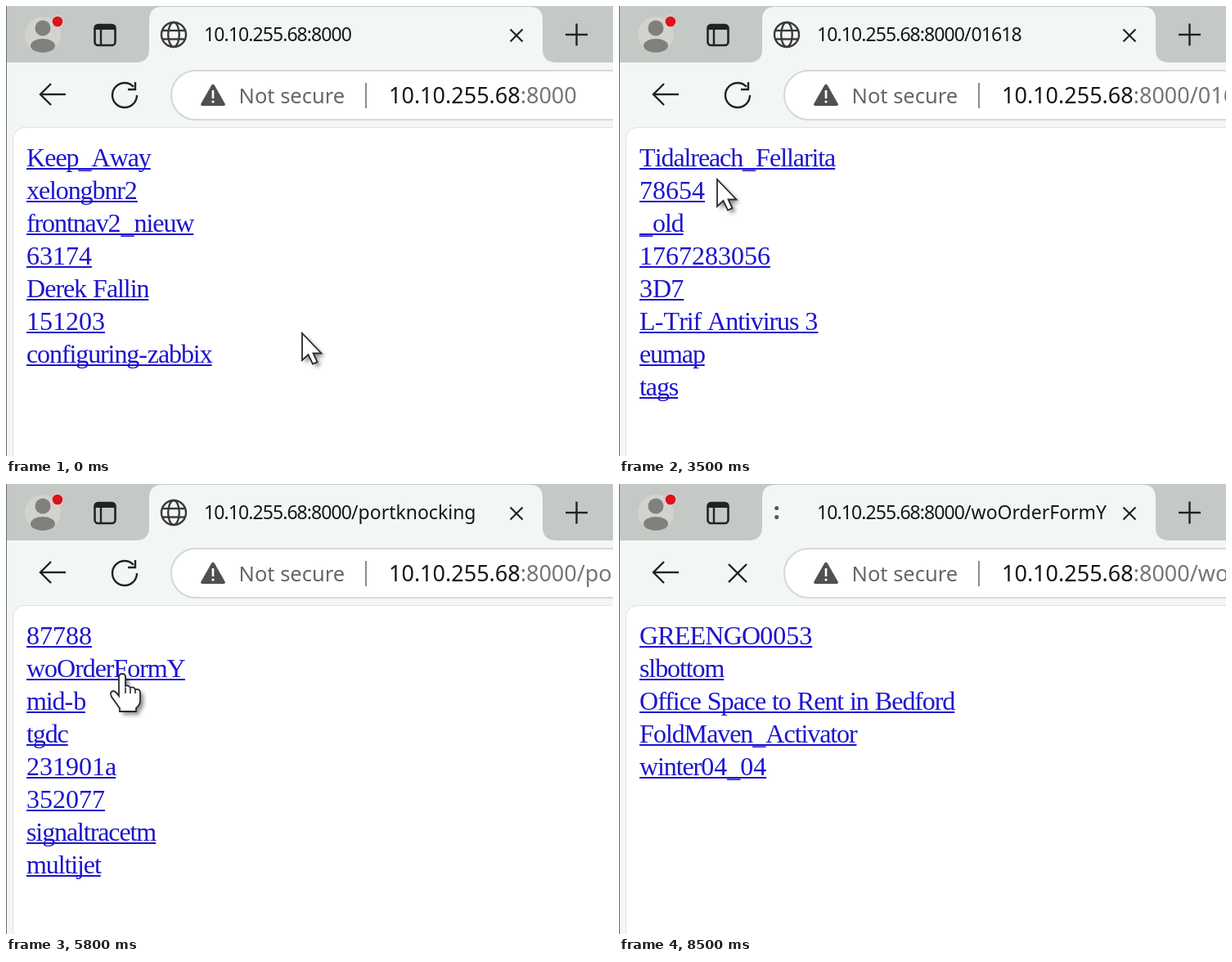
Animation of 742 by 550 pixels, one loop 8.6 s. Source, as an HTML page with a canvas:

```html
<!DOCTYPE html>
<html lang="en">
<head>
<meta charset="utf-8">
<title>Link maze</title>
<style>
  html, body { margin: 0; width: 100%; height: 100%; overflow: hidden; background: #fff; }
  canvas { display: block; width: 742px; height: 550px; }
</style>
</head>
<body>
<canvas id="stage" width="742" height="550"></canvas>
<script>
const ctx = document.getElementById('stage').getContext('2d');
const LOOP = 8600, STEP = 100;
const SANS = '"Noto Sans", "Open Sans", sans-serif';
const SERIF = '"Liberation Serif", "Times New Roman", serif';
const HOST = '10.10.255.68', PORT = ':8000';
const STRIP = '#c5c9c5', BAR = '#f3f7f4', INK = '#222', LINK = '#1d15cc';

const pages = [
  { at: 0, path: '', links: ['Keep_Away', 'xelongbnr2', 'frontnav2_nieuw', '63174', 'Derek Fallin', '151203', 'configuring-zabbix'] },
  { at: 1100, path: '/Keep_Away', links: ['2003022209_pthomenetworkside27', 'Elfen', '01618', '74397', 'hightech'] },
  { at: 2900, path: '/01618', links: ['Tidalreach_Fellarita', '78654', '_old', '1767283056', '3D7', 'L-Trif Antivirus 3', 'eumap', 'tags'] },
  { at: 4600, path: '/Tidalreach_Fellarita', links: ['20031104', 'portknocking', 'menu_top', '44718', 'archive2'] },
  { at: 5800, path: '/portknocking', links: ['87788', 'woOrderFormY', 'mid-b', 'tgdc', '231901a', '352077', 'signaltracetm', 'multijet'] },
  { at: 7300, path: '/woOrderFormY', links: ['GREENGO0053', 'slbottom', 'Office Space to Rent in Bedford', 'FoldMaven_Activator', 'winter04_04'] }
];

// Row pressed just before each load, then the span of its spinner
const loads = [
  { row: 0, from: 800, to: 1100 },
  { row: 2, from: 2500, to: 2900 },
  { row: 0, from: 4200, to: 4700 },
  { row: 1, from: 5400, to: 5800 },
  { row: 1, from: 6800, to: 7600 },
  { row: 2, from: 8500, to: 8600 }
];

// Pointer stops: time, x, y
const stops = [
  [0, 362, 400], [600, 110, 190], [1000, 112, 192], [1500, 330, 300], [1800, 349, 315],
  [2000, 115, 235], [2400, 85, 262], [2900, 88, 264], [3500, 120, 212], [4100, 130, 190],
  [4800, 130, 190], [5100, 306, 394], [5400, 142, 232], [5800, 142, 232], [6300, 300, 340],
  [6700, 84, 222], [7100, 84, 222], [7500, 59, 222], [7700, 363, 314], [7800, 355, 305],
  [7900, 355, 305], [8200, 200, 266], [8600, 200, 266]
];

const arrow = new Path2D('M0 0V33L7.5 26L13 37.5L18.5 35L13.5 24.5H23.5Z');
const hand = new Path2D('M-4 4Q-4 0 0 0T4 4V15Q7 13 10 17Q14 15 16 19Q22 18 22 23V33Q22 38 17 42V46H-3V42L-13 28Q-16 22 -11 21Q-8 21 -4 27Z');

function line(color, width, ...pts) {
  ctx.strokeStyle = color;
  ctx.lineWidth = width;
  ctx.beginPath();
  pts.forEach(([x, y]) => ctx.lineTo(x, y));
  ctx.stroke();
}

function disc(x, y, r, color) {
  ctx.fillStyle = color;
  ctx.beginPath();
  ctx.arc(x, y, r, 0, 7);
  ctx.fill();
}

function cross(x, y, r, width) {
  line(INK, width, [x - r, y - r], [x + r, y + r]);
  line(INK, width, [x + r, y - r], [x - r, y + r]);
}

// Returns the x where the text ends
function text(str, x, y, font, color, spacing = 0) {
  ctx.font = font;
  ctx.fillStyle = color;
  ctx.letterSpacing = spacing + 'px';
  ctx.fillText(str, x, y);
  const end = x + ctx.measureText(str).width;
  ctx.letterSpacing = '0px';
  return end;
}

function drawAvatar() {
  disc(45, 35, 22, '#d3d2cf');
  disc(45, 27, 9.5, '#82807e');
  ctx.beginPath();
  ctx.ellipse(45, 48.5, 15, 8.5, 0, 0, 7);
  ctx.fill();
  disc(63, 19, 7.5, '#e3cfcc');
  disc(63, 19, 6.3, '#da1418');
}

function drawStrip() {
  ctx.fillStyle = STRIP;
  ctx.fillRect(0, 0, 742, 69);
  drawAvatar();

  ctx.strokeStyle = INK;
  ctx.lineWidth = 2.6;
  ctx.beginPath();
  ctx.roundRect(108.5, 23, 25, 25, 4);
  ctx.stroke();
  ctx.fillStyle = INK;
  ctx.fillRect(109, 23, 24, 6);
  line(INK, 2.4, [116, 27], [116, 47]);

  ctx.fillStyle = BAR;
  ctx.fill(new Path2D('M158 69Q175 69 175 53V17Q175 1 191 1H640Q656 1 656 17V53Q656 69 673 69Z'));
  cross(624, 36, 7.5, 2.2);
  line(INK, 2.4, [684, 35], [711, 35]);
  line(INK, 2.4, [697.5, 21.5], [697.5, 48.5]);
}

function drawGlobe() {
  ctx.strokeStyle = '#3a3a3a';
  ctx.lineWidth = 2.4;
  ctx.beginPath();
  ctx.arc(205, 35, 15, 0, 7);
  ctx.stroke();
  ctx.beginPath();
  ctx.ellipse(205, 35, 6.8, 15, 0, 0, 7);
  ctx.stroke();
  line('#3a3a3a', 2.4, [191, 30], [219, 30]);
  line('#3a3a3a', 2.4, [191, 40.5], [219, 40.5]);
}

function drawSpinner(age) {
  const count = age < STEP ? 2 : 3;
  const turn = Math.PI + age / 300 * 2 * Math.PI;
  for (let i = 0; i < count; i++) {
    const a = turn + (i - (count - 1) / 2) * 0.9;
    disc(204 + 12.5 * Math.cos(a), 35 + 12.5 * Math.sin(a), 2.5, '#555');
  }
}

function drawReload() {
  ctx.strokeStyle = INK;
  ctx.lineWidth = 2.4;
  ctx.beginPath();
  ctx.arc(145, 109, 15, 0, Math.PI * 1.76);
  ctx.stroke();
  line(INK, 2.4, [158, 93], [158, 102], [149, 102]);
}

// Digits in the tab title are set tighter than letters
function drawTitle(str) {
  const fade = ctx.createLinearGradient(594, 0, 606, 0);
  fade.addColorStop(0, '#161616');
  fade.addColorStop(1, 'rgba(22,22,22,0)');
  let x = 242;
  for (const run of str.match(/[\d.:]+|[^\d.:]+/g)) {
    x = text(run, x, 43, '23px ' + SANS, fade, /\d/.test(run) ? -0.92 : 0);
  }
}

function drawBar(path, load, t) {
  ctx.fillStyle = BAR;
  ctx.fillRect(0, 69, 742, 481);

  if (load) drawSpinner(t - load.from);
  else drawGlobe();
  drawTitle(HOST + PORT + path);

  line(INK, 2.4, [73, 108], [42, 108]);
  line(INK, 2.4, [55, 95], [42, 108], [55, 121]);
  if (load) cross(145, 109, 11, 2.4);
  else drawReload();

  ctx.fillStyle = '#fff';
  ctx.strokeStyle = '#d5d8d5';
  ctx.lineWidth = 2;
  ctx.beginPath();
  ctx.roundRect(202, 79, 600, 60, 30);
  ctx.fill();
  ctx.stroke();

  ctx.fillStyle = '#505050';
  ctx.fill(new Path2D('M251 97Q253 94 255 97L268 120Q268 122 266 122H240Q238 122 238 120Z'));
  line('#fff', 2.6, [253, 103], [253, 113]);
  disc(253, 117, 1.6, '#fff');
  text('Not secure', 284.5, 119, '25.5px ' + SANS, '#666');
  line('#8c8c8c', 2, [440, 94], [440, 125]);

  const urlFont = '27px ' + SANS;
  let x = text(HOST, 468, 119, urlFont, '#161616');
  x = text(PORT, x, 119, urlFont, '#757575');
  text(path, x, 119, urlFont, '#757575');
}

function linkSpacing(run) {
  if (/[a-z]/.test(run)) return -1.1;
  return /[A-Z]/.test(run) ? -0.8 : 0;
}

// The underscore hangs just below the underline
function drawLink(str, row, color) {
  const y = 196 + row * 40;
  let x = 25;
  for (const run of str.match(/[a-z]+|[A-Z]+|_|[^a-zA-Z_]+/g)) {
    x = text(run, x, run === '_' ? y + 2 : y, '32px ' + SERIF, color, linkSpacing(run));
  }
  ctx.fillRect(25, y + 2, x - 25, 2);
  return x;
}

function drawContent(links, pressed) {
  ctx.fillStyle = '#fff';
  ctx.strokeStyle = '#dfe2df';
  ctx.lineWidth = 2;
  ctx.beginPath();
  ctx.roundRect(9, 149, 800, 500, 14);
  ctx.stroke();
  ctx.fill();
  line('#6a6c6a', 1, [0.5, 0], [0.5, 550]);
  return links.map((str, i) => drawLink(str, i, i === pressed ? '#e01010' : LINK));
}

function pointerAt(t) {
  const i = stops.findIndex(s => s[0] > t);
  const [t0, x0, y0] = stops[i - 1], [t1, x1, y1] = stops[i];
  const u = (t - t0) / (t1 - t0), e = u * u * (3 - 2 * u);
  return [x0 + (x1 - x0) * e, y0 + (y1 - y0) * e];
}

function drawPointer(t, ends) {
  const [x, y] = pointerAt(t);
  const row = Math.floor((y - 168) / 40);
  const over = x >= 25 && x <= ends[row] && y - 168 - row * 40 <= 36;
  const shape = over ? hand : arrow;
  ctx.save();
  ctx.translate(x, y);
  ctx.fillStyle = '#fff';
  ctx.strokeStyle = '#2a2a34';
  ctx.lineWidth = 1.8;
  ctx.save();
  ctx.shadowColor = 'rgba(0,0,0,.45)';
  ctx.shadowBlur = 5;
  ctx.shadowOffsetX = ctx.shadowOffsetY = 4;
  ctx.fill(shape);
  ctx.restore();
  ctx.stroke(shape);
  if (over) {
    for (const k of [4, 10, 16]) line('#2a2a34', 1.6, [k, 16 + k / 5], [k, 24]);
  }
  ctx.restore();
}

function draw(now) {
  const t = Math.floor(now % LOOP / STEP) * STEP;
  const page = pages.filter(p => p.at <= t).pop();
  const load = loads.find(l => t >= l.from && t < l.to);
  const press = loads.find(l => t >= l.from - STEP && t < l.from);
  drawStrip();
  drawBar(page.path, load, t);
  const ends = drawContent(page.links, press ? press.row : -1);
  if (t < 8500) drawPointer(t, ends);
}

const start = performance.now();
function tick() {
  draw(performance.now() - start);
  requestAnimationFrame(tick);
}
tick();
</script>
</body>
</html>
```
